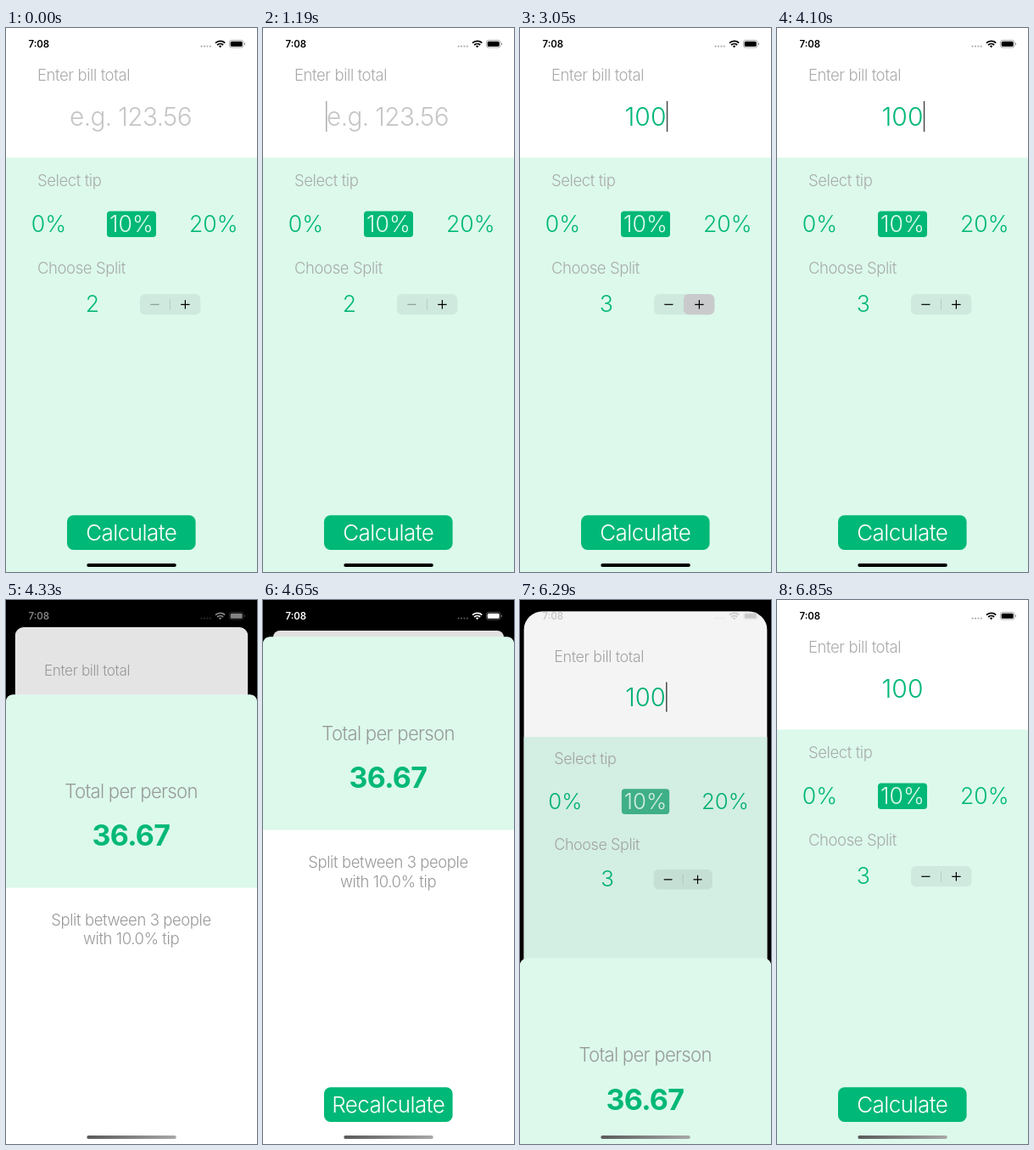
Animation, 296 px wide and 640 px high, one loop 7100 ms. Source, as an HTML page:

```html
<!DOCTYPE html>
<html lang="en">
<head>
<meta charset="utf-8">
<title>Bill splitter</title>
<style>
  html, body { margin: 0; width: 100%; height: 100%; overflow: hidden; background: #000; }
  svg { display: block; width: 296px; height: 640px; }
  text { font-family: Inter, Roboto, sans-serif; font-weight: 300; font-optical-sizing: none; }
  .mid { text-anchor: middle; }
  .label { font-size: 18.5px; letter-spacing: -.022em; fill: #a9abaa; }
  .dark { fill: #989a99; }
  .bill { font-size: 30px; fill: #00b877; }
  .hint { font-size: 29.7px; letter-spacing: -.02em; fill: #c4c5c7; }
  .big { font-size: 26.6px; fill: #00b877; }
  .button { font-size: 26px; letter-spacing: -.021em; fill: #fff; }
  .title { font-size: 22.2px; letter-spacing: -.033em; }
  .total { font-size: 34px; font-weight: 700; letter-spacing: -.02em; fill: #00b877; }
  .time { font-size: 11.4px; font-weight: 600; }
  .green { fill: #00b877; }
  .mint { fill: #dcf9ec; }
</style>
</head>
<body>
<svg viewBox="0 0 296 640">
  <defs>
    <clipPath id="cardClip"><rect id="cardShape" width="296" height="640"/></clipPath>
    <linearGradient id="barFade">
      <stop stop-color="#5a5a5a"/><stop offset="1" stop-color="#a8a8a8"/>
    </linearGradient>
  </defs>
  <rect width="296" height="640"/>

  <g id="card"><g clip-path="url(#cardClip)">
    <rect width="296" height="640" fill="#fff"/>
    <rect class="mint" y="152.5" width="296" height="488"/>

    <text class="label" x="37" y="61.5">Enter bill total</text>
    <text id="hint" class="hint mid" x="147" y="115">e.g. 123.56</text>
    <text id="bill" class="bill mid" x="148" y="115"></text>
    <rect id="cursor" y="86" width="1.5" height="36" fill="#4a4a4a"/>

    <text class="label" x="37" y="185.8">Select tip</text>
    <rect id="chosen" x="119" y="215.5" width="58" height="30.5" rx="3.8"/>
    <text class="big mid" x="50.5" y="240.3">0%</text>
    <text class="big mid mint" x="148" y="240.3">10%</text>
    <text class="big mid" x="244.8" y="240.3">20%</text>

    <text class="label" x="37" y="289">Choose Split</text>
    <text id="split" class="big mid" x="101.8" y="334"></text>
    <rect x="158" y="313" width="71.3" height="24.3" rx="6" fill="#767680" fill-opacity=".12"/>
    <path id="divider" d="M193.5 319v12.5" stroke="#767680" stroke-opacity=".25"/>
    <rect id="pressed" x="193" y="313" width="36.3" height="24.3" rx="6" fill="#c9cacc"/>
    <path id="minus" d="M170.3 325.3h10.2" stroke-width="1.2"/>
    <path d="M206.2 325.3h10.4M211.4 320.1v10.4" stroke="#000" stroke-width="1.2"/>

    <rect class="green" x="72" y="573.3" width="151.6" height="40.8" rx="7.6"/>
    <text id="calculate" class="button mid" x="147.8" y="603.3">Calculate</text>
    <rect id="shade" width="296" height="640"/>
  </g></g>

  <g id="sheet">
    <rect width="296" height="700" rx="8" fill="#fff"/>
    <path class="mint" d="M0 227V8a8 8 0 0 1 8-8H288a8 8 0 0 1 8 8V227z"/>
    <text class="label dark title mid" x="147.6" y="121.6">Total per person</text>
    <text class="total mid" x="147.4" y="177.7">36.67</text>
    <text class="label dark mid" x="147.5" y="271.5">Split between 3 people</text>
    <text class="label dark mid" x="147.5" y="294">with 10.0% tip</text>
    <rect class="green" x="72" y="529.8" width="151.6" height="40.8" rx="7.6"/>
    <text id="recalculate" class="button mid" x="147.8" y="559.8">Recalculate</text>
  </g>

  <g id="status">
    <text class="time" x="26.5" y="23">7:08</text>
    <g opacity=".32">
      <circle cx="230.6" cy="21.6" r="1.1"/><circle cx="234" cy="21.6" r="1.1"/>
      <circle cx="237.4" cy="21.6" r="1.1"/><circle cx="240.8" cy="21.6" r="1.1"/>
    </g>
    <g fill="none" stroke="currentColor" stroke-width="1.8">
      <path d="M247 17.6a8 8 0 0 1 11.2 0M249.1 20a5 5 0 0 1 7 0"/>
    </g>
    <path d="M250.9 21.3a2.5 2.5 0 0 1 3.4 0L252.6 23.3z"/>
    <rect x="263.4" y="14.4" width="16.6" height="8.6" rx="2.6" fill="none" stroke="currentColor" stroke-opacity=".4" stroke-width=".8"/>
    <rect x="264.7" y="15.7" width="14" height="6" rx="1.5"/>
    <path d="M281 17.2a1.6 1.6 0 0 1 0 3z" opacity=".45"/>
  </g>
  <rect id="homeBar" x="95.3" y="630" width="105.5" height="3.9" rx="1.95"/>
</svg>
<script>
const LOOP = 7100;
const el = id => document.getElementById(id);
const set = (id, attrs) => Object.entries(attrs).forEach(([k, v]) => el(id).setAttribute(k, v));

// Step tables: [start time, value]
const ticks = [0, 4100, 4210, 4330, 4440, 4540, 4650, 6180, 6290, 6400, 6510, 6620, 6740, 6850]
  .map(t => [t, t]);
const bill = [[0, ''], [1360, '1'], [1470, '10'], [1610, '100']];
const cursorX = { '': 74, '1': 155.5, '10': 164.5, '100': 172.8 };
const cursorAlpha = [[0, 0], [500, 1], [1190, .45], [1360, 1], [2270, 0], [2470, .5], [2590, 1],
  [3270, 0], [3490, .5], [3610, 1], [6850, 0]];
const pressAlpha = [[0, 0], [2840, .4], [2950, .8], [3050, 1], [3160, .5], [3270, 0]];

const at = (steps, t) => steps.findLast(([start]) => start <= t)[1];
const between = (t, a, b) => t >= a && t < b;
const clamp = x => Math.min(1, Math.max(0, x));
const mix = (a, b, p) => a + (b - a) * p;

// Critically damped spring from 0 to 1
function spring(ms) {
  const x = Math.max(0, ms) * .01826;
  return 1 - (1 + x) * Math.exp(-x);
}
function smooth(ms) {
  const x = clamp(ms / 400);
  return x * x * (3 - 2 * x);
}
const presented = (t, ease) => ease(t - 4126) - ease(t - 6172);

function drawForm(t) {
  const typed = at(bill, t);
  const press = at(pressAlpha, t);
  const three = t >= 2840;
  el('bill').textContent = typed;
  set('hint', { opacity: typed ? 0 : 1 });
  set('cursor', { x: cursorX[typed], opacity: at(cursorAlpha, t) });
  el('split').textContent = three ? '3' : '2';
  set('minus', { stroke: three ? '#000' : '#8b9c95' });
  set('pressed', { opacity: press });
  set('divider', { opacity: 1 - press });
  set('calculate', { opacity: between(t, 3870, 4100) ? .2 : 1 });
  set('recalculate', { opacity: between(t, 5930, 6180) ? .2 : 1 });
}

function drawSheet(t) {
  const held = at(ticks, t);
  const settled = between(held, 4650, 6180);
  const p = settled ? 1 : held >= 6850 ? 0 : clamp(presented(held, spring));
  const scale = 1 - .081 * p;
  const tint = [0, 184, 119].map(c => Math.round(mix(c, 180, p)));
  const grey = Math.round(255 * clamp(presented(held, smooth)));

  set('card', { transform: `translate(${148 * (1 - scale)} ${36 * p}) scale(${scale})` });
  set('cardShape', { rx: p > .001 ? mix(31, 8, p) / scale : 0 });
  set('shade', { opacity: .12 * p });
  set('chosen', { fill: `rgb(${tint})` });
  set('sheet', { transform: `translate(0 ${mix(640, 43.5, p)})` });
  set('status', { fill: `rgb(${grey},${grey},${grey})`, color: `rgb(${grey},${grey},${grey})` });
  set('homeBar', { fill: t < 4210 ? '#000' : 'url(#barFade)' });
}

const start = performance.now();
function frame() {
  const t = (performance.now() - start) % LOOP;
  drawForm(t);
  drawSheet(t);
  requestAnimationFrame(frame);
}
frame();
</script>
</body>
</html>
```
